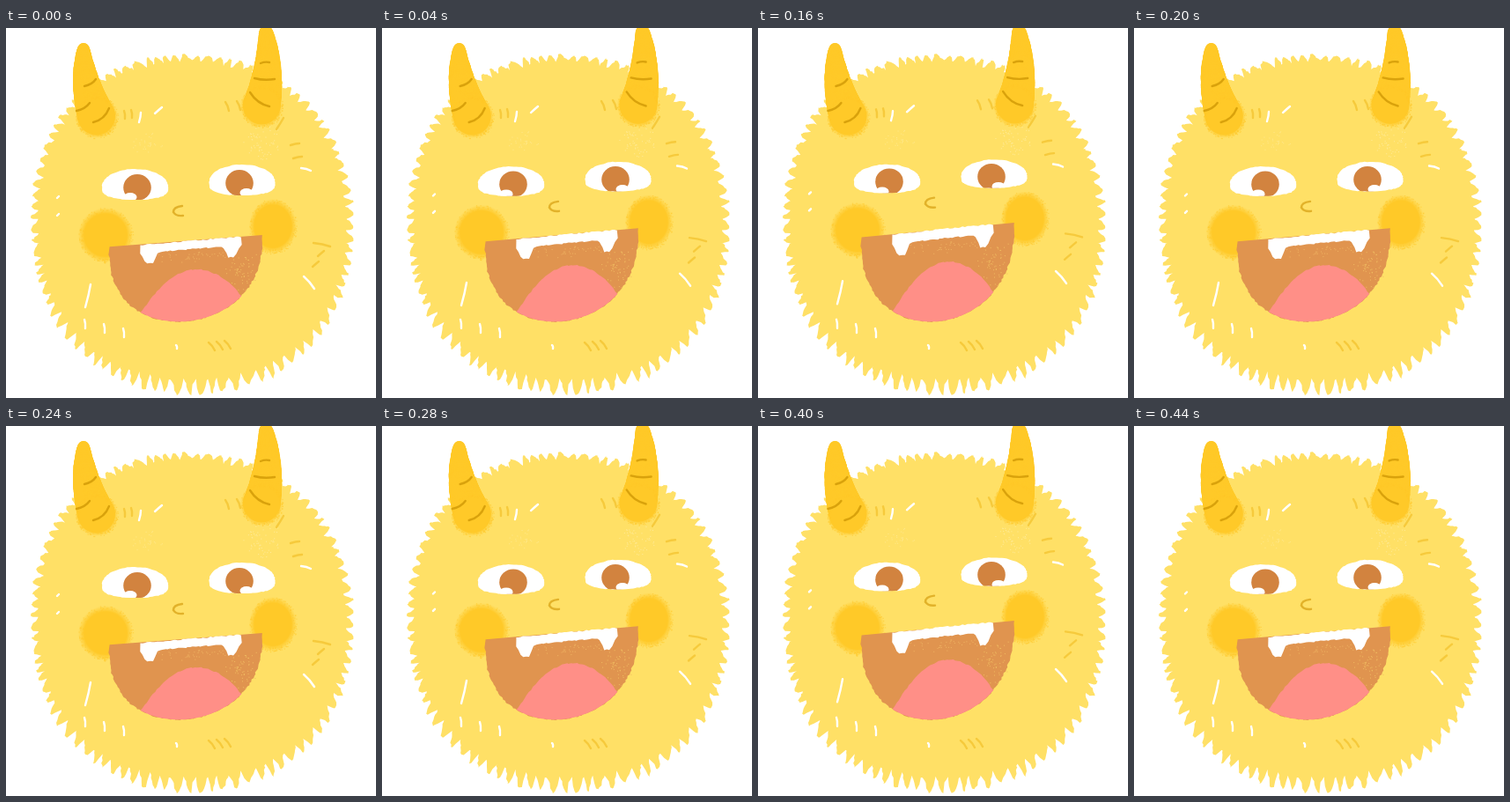
An HTML page with a canvas that plays this animation: 420 px wide and 420 px high, repeating every 0.48 s.

```html
<!DOCTYPE html>
<html lang="en">
<head>
<meta charset="utf-8">
<title>Laughing monster</title>
<style>
html, body { margin: 0; width: 100%; height: 100%; overflow: hidden; background: #fff; }
canvas { display: block; width: 420px; height: 420px; }
</style>
</head>
<body>
<canvas id="stage" width="420" height="420"></canvas>
<script>
const ctx = document.getElementById('stage').getContext('2d');
const C = {
  fur: '#ffe066', horn: '#ffc928', stripe: '#d9a20c', mark: '#f6ca3c', nose: '#e2b22a',
  mouth: '#e0944f', pupil: '#d2833f', tongue: '#ff8f87', white: '#fff'
};
const STEP = 40, HALF = 120, PERIOD = 240, TAU = Math.PI * 2;
const LIP = 240, CHIN = 333;

let lift = 0, seed = 1;

function rnd() {
  seed = (seed * 16807) % 2147483647;
  return seed / 2147483647;
}

const clamp = v => Math.max(0, Math.min(1, v));
const mix = (a, b, t) => a + (b - a) * t;
const sample = (n, fn) => Array.from({ length: n + 1 }, (_, i) => fn(i / n));

// The face is pulled up, most at the lip: fading out above it, zero at the chin.
function pull(x, y) {
  const fade = y < LIP ? Math.exp((y - LIP) / 90) : clamp((CHIN - y) / (CHIN - LIP));
  return lift * 14 * fade * (1 + (x - 205) * 0.0012);
}

const warp = ([x, y], amount = 1) => [x, y - amount * pull(x, y)];

function trace(pts, rough = 0) {
  ctx.beginPath();
  for (const [x, y] of pts) ctx.lineTo(x + (rnd() * 2 - 1) * rough, y + (rnd() * 2 - 1) * rough);
  ctx.closePath();
}

function fill(pts, color, rough = 0.6) {
  trace(pts, rough);
  ctx.fillStyle = color;
  ctx.fill();
}

function clipped(pts, paint) {
  ctx.save();
  trace(pts);
  ctx.clip();
  paint();
  ctx.restore();
}

function ellipse(x, y, rx, ry, color) {
  ctx.beginPath();
  ctx.ellipse(x, y, rx, ry, 0, 0, TAU);
  ctx.fillStyle = color;
  ctx.fill();
}

function curve(x1, y1, cx, cy, x2, y2, color, width = 2.4) {
  ctx.beginPath();
  ctx.moveTo(x1, y1);
  ctx.quadraticCurveTo(cx, cy, x2, y2);
  ctx.strokeStyle = color;
  ctx.lineWidth = width;
  ctx.lineCap = 'round';
  ctx.stroke();
}

// A row of n parallel fur strokes.
function strokes(color, x, y, dx, dy, n = 1, stepX = 0, stepY = 0) {
  for (let i = 0; i < n; i++) {
    const [px, py] = warp([x + i * stepX, y + i * stepY], 0.7);
    curve(px, py, px + dx / 2 + 1, py + dy / 2 - 1, px + dx, py + dy, color);
  }
}

function speckle(count, x, y, w, h, color) {
  ctx.fillStyle = color;
  for (let i = 0; i < count; i++) {
    const p = warp([x + (rnd() + rnd() - 1) * w, y + (rnd() + rnd() - 1) * h]);
    ctx.fillRect(p[0], p[1], 1, 1);
  }
}

// Rounded tufts along a slightly squared ellipse, each one hanging down.
function furOutline() {
  const out = [];
  let a = -Math.PI / 2;
  const end = a + TAU;
  while (a < end) {
    const low = Math.max(0, Math.sin(a));
    const width = Math.min(end - a, (9 + rnd() * 8) / 185);
    const height = 6 + rnd() * 5 + low * 3;
    for (let s = 0; s < 9; s++) {
      const u = s / 9, t = a + u * width;
      const down = Math.cos(t) > 0 ? u : 1 - u;
      const bump = height * (Math.pow(Math.sin(Math.PI * Math.pow(down, 1.7)), 0.7) - 0.55);
      const r = 1 + 0.034 * Math.sin(2 * t) ** 2 - 0.03 * Math.max(0, Math.cos(t + 0.8)) ** 4;
      out.push([
        212 + Math.cos(t) * (180 * r + bump),
        219 + Math.sin(t) * (187 * r + bump) + low * Math.max(0, bump)
      ]);
    }
    a += width;
  }
  return out;
}

function softSpot(x, y, rx, ry) {
  ctx.save();
  ctx.translate(x, y);
  ctx.scale(rx, ry);
  const g = ctx.createRadialGradient(0, 0, 0, 0, 0, 1);
  g.addColorStop(0, C.horn);
  g.addColorStop(0.78, C.horn);
  g.addColorStop(1, 'rgba(255,201,40,0)');
  ctx.fillStyle = g;
  ctx.fillRect(-1, -1, 2, 2);
  ctx.restore();
  ctx.fillStyle = 'rgba(255,201,40,.55)';
  for (let i = 0; i < 160; i++) {
    const a = rnd() * TAU, r = 0.85 + rnd() * 0.16;
    ctx.fillRect(x + Math.cos(a) * rx * r, y + Math.sin(a) * ry * r, 1.2, 1.2);
  }
}

// Tapered sweep along a bent spine from tip to base.
function horn(tipX, tipY, bendX, baseX, baseY, tipR) {
  const midY = (tipY + baseY) / 2;
  for (let t = 0; t <= 1; t += 0.01) {
    const x = mix(mix(tipX, bendX, t), mix(bendX, baseX, t), t);
    const y = mix(mix(tipY, midY, t), mix(midY, baseY, t), t);
    const r = mix(tipR, 21, Math.pow(t, 0.8)) + rnd() * 0.7;
    ellipse(x, y, r, r, C.horn);
  }
  softSpot(baseX, baseY, 24, 24);
}

function horns(k) {
  ctx.save();
  ctx.translate(-0.6 * k, 0);
  horn(88, 23, 87, 103, 101, 6);
  curve(89, 66, 98, 64, 102, 58, C.stripe);
  curve(80, 94, 90, 92, 95, 85, C.stripe);
  curve(99, 107, 112, 104, 117, 91, C.stripe);
  ctx.translate(1.8 * k, -k);
  horn(295, 4, 301, 290, 89, 7);
  curve(289, 40, 294, 38, 299, 39, C.stripe);
  curve(282, 57, 293, 60, 305, 58, C.stripe);
  curve(277, 73, 285, 86, 299, 89, C.stripe);
  ctx.restore();
}

function furMarks() {
  strokes(C.mark, 134, 94, 1, 9, 2, 8, -1);
  strokes(C.mark, 249, 84, 4, 10, 2, 13, -1);
  strokes(C.mark, 315, 102, -8, 13);
  strokes(C.mark, 323, 133, 10, -2, 2, 3, 15);
  strokes(C.mark, 349, 244, 19, 4);
  strokes(C.mark, 361, 253, -7, 6, 2, -6, 12);
  strokes(C.mark, 230, 357, 7, 9, 3, 9, -1);
  strokes(C.white, 153, 96, -2, 11);
  strokes(C.white, 177, 90, -8, 7);
  strokes(C.white, 335, 159, 11, 3);
  strokes(C.white, 338, 282, 12, 14);
  strokes(C.white, 96, 291, -6, 26);
  strokes(C.white, 89, 331, 1, 10, 3, 22, 5);
  strokes(C.white, 193, 360, 1, 4);
  strokes(C.white, 60, 211, -2, 2, 2, 0, -20);
}

// Round on top, flatter below; side sets where the glint sits.
function eye(x, y, pupilX, side) {
  const white = sample(80, t => {
    const s = Math.sin(t * TAU);
    return warp([x + 37.5 * Math.cos(t * TAU), y + (s < 0 ? 20 * s : 15 * Math.pow(s, 0.55))]);
  });
  fill(white, C.white, 0.4);
  clipped(white, () => {
    const [px, py] = warp([pupilX, y + 1]);
    ellipse(px, py, 15.8, 15, C.pupil);
    ellipse(px + side * 8, py + 11, 7.5, 5, C.white);
  });
}

const lipY = x => mix(249, 235, (x - 117) / 174);

function mouth() {
  const lips = sample(120, t => {
    const a = t * Math.PI, x = 204 + 87 * Math.cos(a);
    return warp([x, lipY(x) + 91 * Math.pow(Math.abs(Math.sin(a)), 0.8)]);
  });
  fill(lips, C.mouth, 0.8);
  speckle(60, 264, 276, 20, 24, '#f0bc62');
  speckle(40, 215, 258, 44, 8, '#efb463');

  const tongue = sample(60, t => {
    const x = mix(145, 289, t);
    return warp([x, 274 + 43 * ((x - 217) / 60) ** 2]);
  });
  clipped(lips, () => fill(tongue, C.tongue));

  const fang = (x, at) => clamp((10 - Math.abs(x - at)) / 6);
  const top = sample(40, t => [mix(152, 267, t), lipY(mix(152, 267, t))]);
  const bottom = top.map(([x, y]) => [x, y + 9.5 + 12 * fang(x, 163) + 13 * fang(x, 256)]).reverse();
  fill(top.concat(bottom).map(p => warp(p)), C.white, 0.7);
}

const fur = furOutline();

function draw(k) {
  lift = k;
  seed = 77;
  ctx.fillStyle = C.white;
  ctx.fillRect(0, 0, 420, 420);
  fill(fur, C.fur, 0.9);
  speckle(60, 290, 130, 24, 22, '#ffeb9b');
  speckle(30, 160, 130, 22, 12, '#ffe88c');
  horns(k);
  furMarks();

  softSpot(113, 235 - 6 * k, 31, 31);
  softSpot(303, 225 - 9 * k, 27, 31);
  eye(146.5, 180, 149, -1);
  eye(268, 175, 265, 1);
  const n = 208 - pull(195, 208);
  curve(200, n - 6, 190, n - 5, 190, n + 1, C.nose);
  curve(190, n + 1, 193, n + 6, 201, n + 5, C.nose);
  mouth();
}

let last = -1;
function frame(now) {
  const t = Math.floor(now / STEP) * STEP % PERIOD;
  if (t !== last) {
    last = t;
    const u = 1 - Math.abs(t - HALF) / HALF;
    draw(1.75 * u - 0.45 * u * u);
  }
  requestAnimationFrame(frame);
}
draw(0);
requestAnimationFrame(frame);
</script>
</body>
</html>
```
